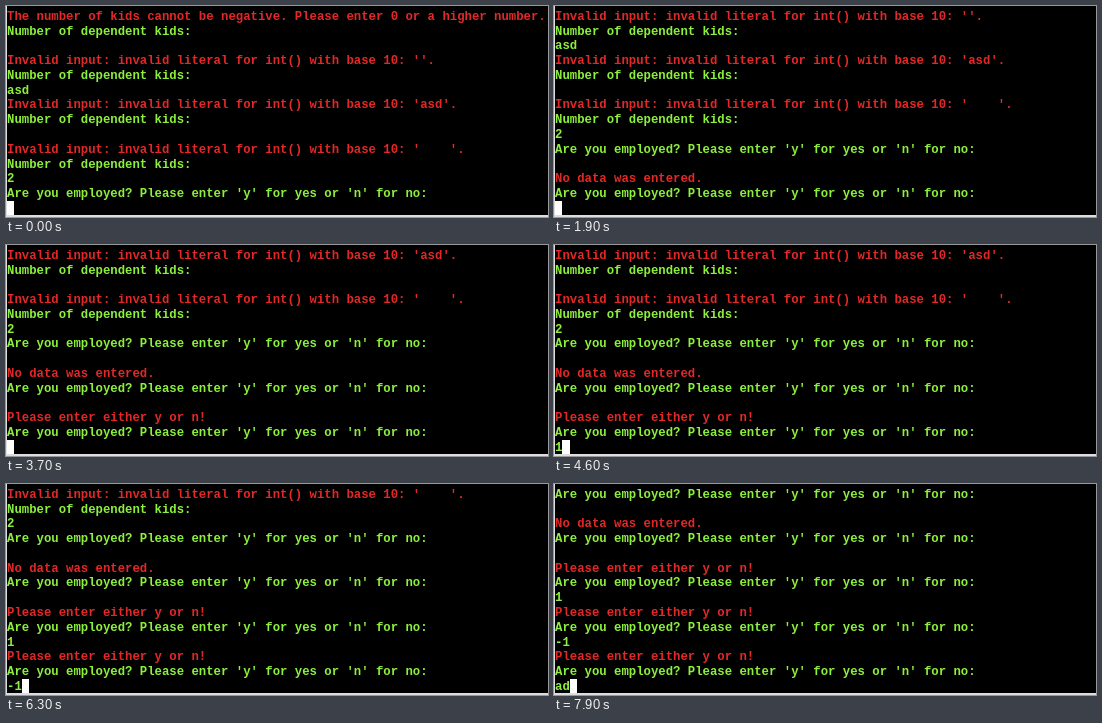
These frames come from a looping animation (542x211 px, 8 s). An HTML page:

```html
<!DOCTYPE html>
<html lang="en">
<head>
<meta charset="utf-8">
<title>Terminal session</title>
<style>
  html, body { margin: 0; width: 100%; height: 100%; overflow: hidden; background: #000; }
  #screen {
    position: absolute; inset: 0; box-sizing: border-box;
    border-left: 1px solid #ddd; border-bottom: 2px solid #ddd;
    overflow: hidden; white-space: pre; color: #8cf03c;
    font: bold 12.315px "Liberation Mono", "Courier New", monospace;
  }
  /* The taller line box lowers the text within its row. */
  #screen div { position: absolute; left: 0; height: 14.77px; line-height: 17px; }
  .error { color: #e32828; }
  #cursor { width: 7.4px; background: #fff; }
</style>
</head>
<body>
<div id="screen"></div>
<script>
const LOOP = 8000, ROWS = 14, LINE = 14.77, CHAR = 7.39, TOP = 2.8;
const KIDS = "Number of dependent kids:";
const JOB = "Are you employed? Please enter 'y' for yes or 'n' for no:";
const EITHER = "Please enter either y or n!";
const invalid = s => `Invalid input: invalid literal for int() with base 10: '${s}'.`;

const history = [
  "The number of kids cannot be negative. Please enter 0 or a higher number.",
  KIDS, "", invalid(""),
  KIDS, "asd", invalid("asd"),
  KIDS, "", invalid("    "),
  KIDS, "2", JOB
];

// Each answer: key presses [time, key], then the time of Enter and the reply.
const answers = [
  { keys: [], enter: 1900, reply: "No data was entered." },
  { keys: [[2800, " "], [3000, " "], [3100, " "]], enter: 3500, reply: EITHER },
  { keys: [[4300, "1"]], enter: 4900, reply: EITHER },
  { keys: [[5900, "-"], [6100, "1"]], enter: 6700, reply: EITHER },
  { keys: [[7600, "a"], [7800, "d"]], enter: Infinity }
];

const screen = document.getElementById("screen");
let shown;

function linesAt(t) {
  const lines = [...history];
  for (const { keys, enter, reply } of answers) {
    lines.push(keys.filter(([at]) => at <= t).map(([, key]) => key).join(""));
    if (t < enter) break;
    lines.push(reply, JOB);
  }
  return lines.slice(-ROWS);
}

function addRow(text, row) {
  const div = document.createElement("div");
  div.textContent = text;
  div.style.top = TOP + row * LINE + "px";
  if (/^(The|Invalid|No data|Please)/.test(text)) div.className = "error";
  screen.append(div);
  return div;
}

function draw(now) {
  const lines = linesAt(now % LOOP), state = lines.join("\n");
  if (state !== shown) {
    shown = state;
    screen.replaceChildren();
    lines.forEach(addRow);
    const cursor = addRow("", ROWS - 1);
    cursor.id = "cursor";
    cursor.style.left = lines[ROWS - 1].length * CHAR + "px";
  }
  requestAnimationFrame(draw);
}

draw(performance.now());
</script>
</body>
</html>
```
